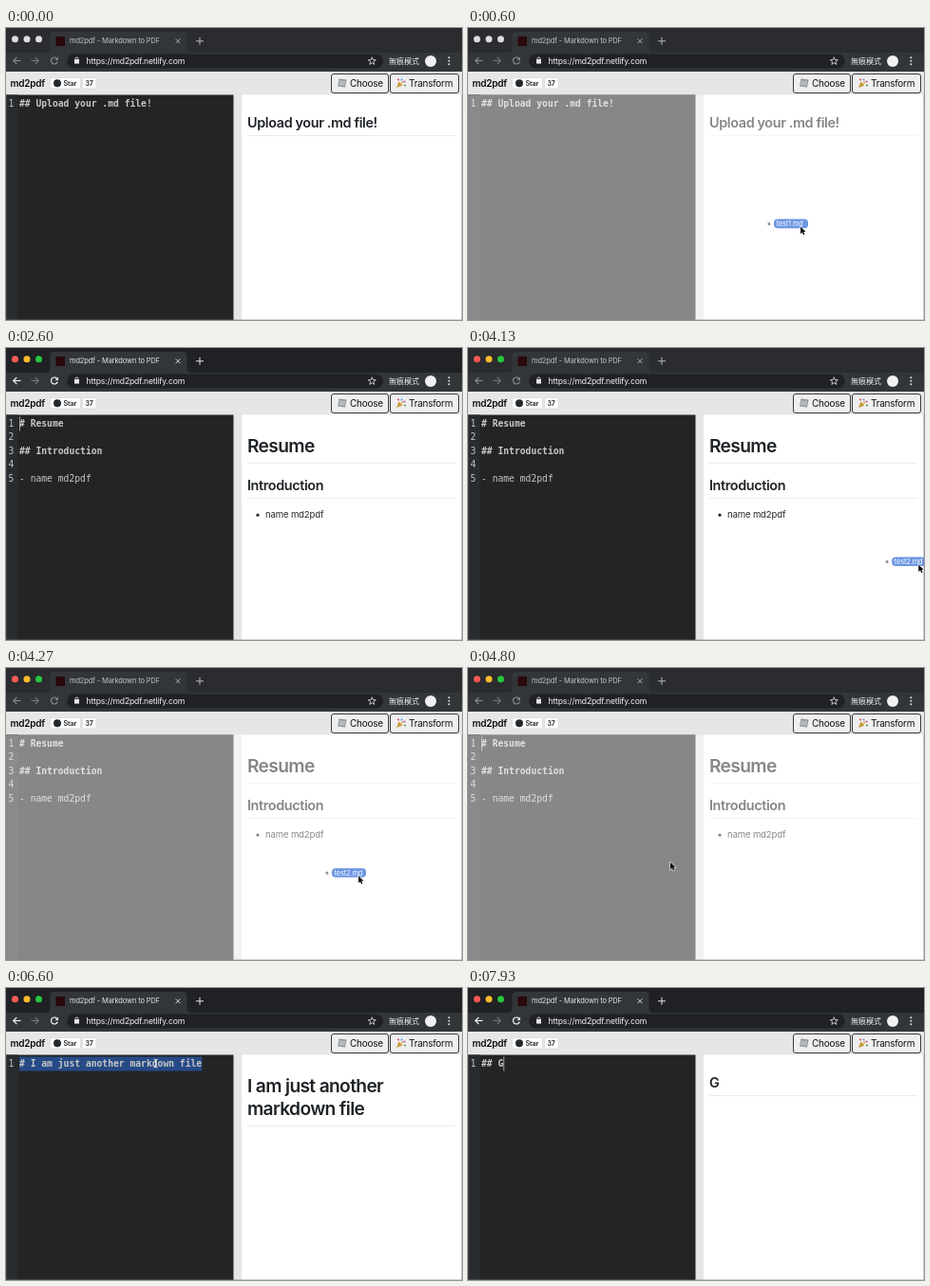
These frames come from a looping animation (480 by 308 pixels, 8 s). An HTML page with a canvas:

```html
<!DOCTYPE html>
<html lang="en">
<head>
<meta charset="utf-8">
<title>Markdown to PDF</title>
<style>
html, body { margin: 0; width: 100%; height: 100%; overflow: hidden; background: #fff; }
canvas { display: block; width: 480px; height: 308px; }
</style>
</head>
<body>
<canvas id="stage"></canvas>
<script>
const W = 480, H = 308, LOOP = 8000, FPS = 15;
const SANS = 'Inter, "Liberation Sans", sans-serif';
const MONO = '"DejaVu Sans Mono", monospace';
const CJK = '"Noto Sans CJK TC", "Noto Sans CJK", "Noto Sans CJK JP", sans-serif';
const MONO_SIZE = 9.68, CHAR = MONO_SIZE * 0.602, LINE = 14.4, TEXT_X = 14;
const TOP = 70.5, EDITOR_W = 239.5;

const canvas = document.getElementById('stage');
const dpr = window.devicePixelRatio || 1;
canvas.width = W * dpr;
canvas.height = H * dpr;
const ctx = canvas.getContext('2d');
ctx.scale(dpr, dpr);

// ---------- helpers ----------
function rect(x, y, w, h, color) {
  ctx.fillStyle = color;
  ctx.fillRect(x, y, w, h);
}

function round(x, y, w, h, r, fill, stroke) {
  ctx.beginPath();
  ctx.roundRect(x, y, w, h, r);
  if (fill) { ctx.fillStyle = fill; ctx.fill(); }
  if (stroke) { ctx.strokeStyle = stroke; ctx.lineWidth = 1; ctx.stroke(); }
}

function dot(x, y, r, color) {
  ctx.beginPath();
  ctx.arc(x, y, r, 0, Math.PI * 2);
  ctx.fillStyle = color;
  ctx.fill();
}

function path(points, { fill, stroke, width = 1, close } = {}) {
  ctx.beginPath();
  points.forEach(([x, y], i) => i ? ctx.lineTo(x, y) : ctx.moveTo(x, y));
  if (close || fill) ctx.closePath();
  if (stroke) { ctx.strokeStyle = stroke; ctx.lineWidth = width; ctx.stroke(); }
  if (fill) { ctx.fillStyle = fill; ctx.fill(); }
}

function text(str, x, y, size, color, { weight = 400, family = SANS, track = 0 } = {}) {
  ctx.font = `${weight} ${size}px ${family}`;
  ctx.letterSpacing = `${track * size}px`;
  ctx.fillStyle = color;
  ctx.fillText(str, x, y);
}

const within = (n, ...spans) => spans.some(([a, b]) => n >= a && n < b);

function glide(n, a, b, from, to) {
  const p = Math.min(1, Math.max(0, (n - a) / (b - a)));
  const e = p * (2 - p);
  return from.map((v, i) => v + (to[i] - v) * e);
}

// ---------- browser chrome ----------
function drawTabs(focused, lit) {
  rect(0, 0, W, 26, focused ? '#202124' : '#2a2c2f');
  const lights = lit ? ['#fc5a55', '#fdbc2e', '#29c83f'] : ['#dcdddd', '#dcdddd', '#dcdddd'];
  lights.forEach((c, i) => dot(9.5 + i * 12.5, 11.7, 3.5, c));

  ctx.beginPath();
  ctx.moveTo(42, 26);
  ctx.quadraticCurveTo(46.5, 26, 46.5, 21);
  ctx.lineTo(46.5, 8);
  ctx.quadraticCurveTo(46.5, 4, 51, 4);
  ctx.lineTo(186, 4);
  ctx.quadraticCurveTo(190.5, 4, 190.5, 8);
  ctx.lineTo(190.5, 21);
  ctx.quadraticCurveTo(190.5, 26, 195, 26);
  ctx.fillStyle = '#323639';
  ctx.fill();

  rect(52.5, 9, 9.5, 10, '#2a0809');
  text('md2pdf - Markdown to PDF', 67, 16.3, 7.5, focused ? '#e4e6e8' : '#c0c3c6', { track: -0.02 });

  const mark = focused ? '#d4d6d8' : '#a9acaf';
  path([[178.6, 11.4], [183.4, 16.2]], { stroke: mark });
  path([[183.4, 11.4], [178.6, 16.2]], { stroke: mark });
  path([[200, 13.8], [208, 13.8]], { stroke: mark, width: 1.1 });
  path([[204, 9.8], [204, 17.8]], { stroke: mark, width: 1.1 });
}

function drawToolbar(focused) {
  rect(0, 26, W, 20, '#323639');
  const on = focused ? '#f1f2f3' : '#85888b', off = '#6f7376';

  path([[15.5, 34.5], [7.8, 34.5]], { stroke: on, width: 1.2 });
  path([[11.4, 30.8], [7.7, 34.5], [11.4, 38.2]], { stroke: on, width: 1.2 });
  path([[26.5, 34.5], [34.2, 34.5]], { stroke: off, width: 1.2 });
  path([[30.6, 30.8], [34.3, 34.5], [30.6, 38.2]], { stroke: off, width: 1.2 });

  ctx.beginPath();
  ctx.arc(51, 34.5, 3.5, 0.3, Math.PI * 1.75);
  ctx.strokeStyle = on;
  ctx.lineWidth = 1.2;
  ctx.stroke();
  path([[55, 30.5], [55, 34], [51.5, 34]], { fill: on });

  round(64, 27.5, 333, 15, 7.5, '#202124');
  ctx.beginPath();
  ctx.arc(74.5, 32.6, 1.6, Math.PI, 0);
  ctx.strokeStyle = '#e6e7e8';
  ctx.lineWidth = 1;
  ctx.stroke();
  rect(72, 33, 5, 4.6, '#e6e7e8');
  text('https://md2pdf.netlify.com', 84.5, 37.6, 8.65, '#f2f3f4', { track: -0.02 });

  const star = Array.from({ length: 10 }, (_, i) => {
    const r = i % 2 ? 1.8 : 4.2, a = -Math.PI / 2 + i * Math.PI / 5;
    return [385.3 + r * Math.cos(a), 35 + r * Math.sin(a)];
  });
  path(star, { stroke: '#d6d8da', width: 0.9, close: true });

  text('無痕模式', 403, 37.8, 8, '#f1f2f3', { family: CJK });
  dot(447, 35, 6, '#f1f2f3');
  [31.2, 34.7, 38.2].forEach(y => dot(466.3, y, 1, '#e2e4e6'));
}

// ---------- page header ----------
function drawHeader() {
  rect(0, 46, W, H - 46, '#e7e6e7');
  text('md2pdf', 4.5, 61.8, 10, '#0c0c0c', { weight: 600, track: -0.025 });

  round(46.5, 52.5, 32, 11.5, 2, '#fcfcfc', '#dedede');
  dot(54, 58.3, 4, '#24292e');
  text('Star', 60.5, 61, 7.2, '#222', { weight: 600, track: -0.02 });
  round(80.5, 52.5, 14.5, 11.5, 2, '#fff', '#dedede');
  text('37', 83.4, 61, 7, '#222', { weight: 600, track: -0.03 });

  round(342.5, 48.5, 60, 20, 2.5, '#efefef', '#3a3a3a');
  round(404.5, 48.5, 72, 20, 2.5, '#efefef', '#3a3a3a');
  text('Choose', 362, 62.2, 10, '#111', { track: -0.025 });
  text('Transform', 424, 62.2, 10, '#111', { track: -0.025 });

  // folder
  path([[350.5, 53.5], [358.5, 54.5], [357, 62.5], [349, 61.5]], { fill: '#8b9295' });
  path([[350.8, 55], [357.5, 55.8], [356.4, 61.2], [350, 60.4]], { fill: '#b3b8ba' });
  // party popper
  path([[411, 63], [413.5, 56.5], [417.5, 60.5]], { fill: '#c9983a' });
  [[413, 54.5, '#d9534f'], [416.5, 54.5, '#5a9bd5'], [419.5, 56.5, '#c65aa5'],
   [417, 57.5, '#d9a63c'], [420, 60.5, '#58a55c']].forEach(([x, y, c]) => dot(x, y, 1.1, c));
}

// ---------- editor and preview ----------
const DOCS = {
  upload: ['## Upload your .md file!'],
  resume: ['# Resume', '', '## Introduction', '', '- name md2pdf'],
  another: ['# I am just another markdown file']
};

function typed(n) {
  return '## G'.slice(0, n >= 119 ? 4 : n >= 113 ? 3 : n >= 110 ? 2 : n >= 108 ? 1 : 0);
}

function docAt(n) {
  if (n < 23) return 'upload';
  if (n < 74) return 'resume';
  return n < 104 ? 'another' : 'typing';
}

function drawEditor(n, doc) {
  rect(0, TOP, EDITOR_W, H - TOP, '#242424');
  rect(0, TOP, 12.5, H - TOP, '#292c2f');

  const lines = DOCS[doc] || [typed(n)];
  if (n === 98) rect(TEXT_X + 20 * CHAR, 72.5, 8 * CHAR, 15, '#264a86');
  if (within(n, [99, 104])) rect(TEXT_X, 72.5, 33 * CHAR, 15, '#264a86');

  lines.forEach((line, i) => {
    const y = 83 + i * LINE;
    text(String(i + 1), 2.6, y, MONO_SIZE, '#bfc2c1', { family: MONO });
    const weight = line.startsWith('#') ? 700 : 400;
    text(line, TEXT_X, y, MONO_SIZE, '#c5c8c6', { weight, family: MONO });
  });

  const blink = within(n, [21, 30], [38, 46], [53, 60], [72, 81], [89, 96], [104, 120]);
  if (blink) {
    const col = doc === 'typing' ? lines[0].length : doc === 'upload' ? 1.2 : 0;
    rect(TEXT_X + col * CHAR, 72.5, 0.9, 15, '#aeafad');
  }
}

function heading(lines, baseline, size, rule) {
  const track = size > 16 ? -0.034 : -0.026;
  lines.forEach((s, i) =>
    text(s, 254, baseline + i * 24, size, '#1f2327', { weight: 600, track }));
  rect(254, rule, 219.5, 0.8, '#e6e8ea');
}

function drawPreview(n, doc) {
  rect(248, TOP, W - 248, H - TOP, '#fff');
  if (doc === 'upload') heading(['Upload your .md file!'], 105, 14.4, 113);
  if (doc === 'resume') {
    heading(['Resume'], 110.3, 19.2, 121);
    heading(['Introduction'], 150.3, 14.4, 158);
    dot(265, 176.2, 1.6, '#24292e');
    text('name md2pdf', 273, 179.4, 9.6, '#24292e', { track: -0.018 });
  }
  if (doc === 'another') heading(['I am just another', 'markdown file'], 110.3, 19.2, 145);
  if (n >= 119) heading(['G'], 105, 14.4, 113);
}

function drawWindowEdge() {
  const edge = 'rgba(128,128,128,.4)';
  rect(0, TOP, 0.6, H - TOP, edge);
  rect(W - 1, TOP, 1, H - TOP, edge);
  rect(0, H - 0.8, W, 0.8, edge);
}

// ---------- pointer ----------
function drawArrow(x, y) {
  const shape = [[0, 0], [0, 7.6], [1.8, 6], [3, 8.7], [4.3, 8.1], [3.2, 5.5], [5.5, 5.3]];
  path(shape.map(([a, b]) => [x + a, y + b]), { fill: '#111', stroke: 'rgba(255,255,255,.85)', width: 1.2 });
}

function drawBeam(x, y) {
  path([[x, y - 4], [x, y + 4]], { stroke: '#e8e8e8', width: 1.1 });
  [-4.3, 4.3].forEach(d =>
    path([[x - 2, y + d], [x, y + d * 0.85], [x + 2, y + d]], { stroke: '#e8e8e8', width: 0.9 }));
}

function drawFile(x, y, name) {
  rect(x - 36, y - 7.5, 6, 8, 'rgba(255,255,255,.8)');
  rect(x - 34.4, y - 4.4, 2.6, 2.8, '#8d9299');
  round(x - 28, y - 8, 36, 9.6, 4, '#6c95e2');
  text(name, x - 25.5, y - 0.7, 7.4, '#fff', { track: -0.015 });
}

function drawPointer(n) {
  if (within(n, [7, 23])) {
    const [x, y] = glide(n, 7, 17, [460, 222], [154.5, 187.5]);
    if (n < 21) drawFile(x, y, 'test1.md');
    drawArrow(x, y);
  } else if (within(n, [23, 39])) {
    drawBeam(...glide(n, 35, 38, [155, 191], [296, 198]));
  } else if (within(n, [62, 74])) {
    const [x, y] = glide(n, 62, 71, [474.2, 228.5], [213, 205]);
    if (n < 72) drawFile(x, y, 'test2.md');
    drawArrow(x, y);
  } else if (within(n, [74, 104])) {
    drawBeam(...glide(n, 80, 92, [213, 209], [157.5, 79.5]));
  }
}

// ---------- loop ----------
function draw(ms) {
  const n = Math.floor((ms % LOOP + 5) * FPS / 1000) % 120;
  const focused = within(n, [23, 60], [74, 120]);
  const doc = docAt(n);
  drawTabs(focused, n >= 21);
  drawToolbar(focused);
  drawHeader();
  drawEditor(n, doc);
  drawPreview(n, doc);
  if (within(n, [8, 23], [63, 74])) rect(0, TOP, W, H - TOP, 'rgba(255,255,255,.45)');
  drawWindowEdge();
  drawPointer(n);
}

const start = performance.now();
function tick() {
  draw(performance.now() - start);
  requestAnimationFrame(tick);
}
tick();
</script>
</body>
</html>
```
